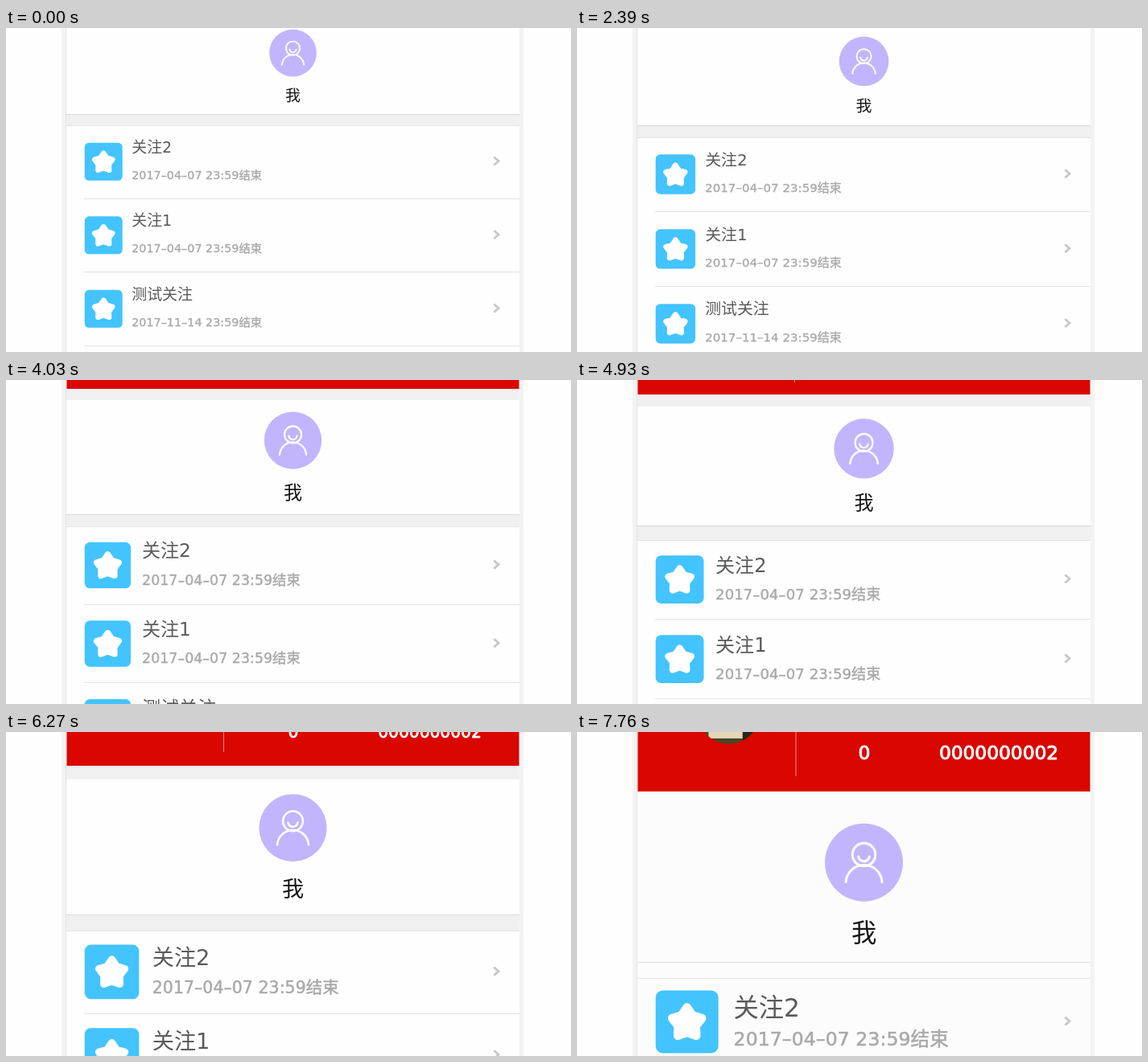
An HTML page with a canvas for the animation above (8 s loop, 702 by 403 pixels).

```html
<!DOCTYPE html>
<html lang="zh">
<head>
<meta charset="utf-8">
<title>列表缩放</title>
<style>
  html, body { margin: 0; width: 100%; height: 100%; overflow: hidden; background: #fefefe; }
  canvas { display: block; }
</style>
</head>
<body>
<canvas id="stage" width="702" height="403"></canvas>
<script>
const ctx = document.getElementById('stage').getContext('2d');
const LOOP = 8000, LEFT = 75, RIGHT = 638, MID = 356.5, INSET = 97;
const FONT = '"DejaVu Sans", "Noto Sans CJK SC", "Noto Sans CJK", sans-serif';

// start time, root size, profile bottom, list top
const STEPS = [
  [0, 9.46, 107, 121], [1350, 8.96, 94, 106], [1940, 9.46, 107, 121],
  [2390, 9.93, 121, 136], [2840, 10.45, 136, 151], [3280, 10.95, 151, 166],
  [3430, 11.52, 167, 182], [4930, 12.01, 181, 199], [5370, 12.51, 197, 215],
  [5820, 13.04, 212, 231], [6270, 13.57, 227, 247], [6570, 14.1, 242, 262],
  [7020, 14.6, 256, 277], [7310, 15.1, 271, 291], [7760, 15.63, 286, 306]
];
const ROWS = [
  ['关注2', '2017–04–07 23:59结束'],
  ['关注1', '2017–04–07 23:59结束'],
  ['测试关注', '2017–11–14 23:59结束'],
  ['test2', '2017–11–14 23:59结束']
];

function box(x, y, w, h, color) {
  ctx.fillStyle = color;
  ctx.fillRect(x, y, w, h);
}

function disc(x, y, r, color) {
  ctx.fillStyle = color;
  ctx.beginPath();
  ctx.arc(x, y, r, 0, 7);
  ctx.fill();
}

// y is the middle of the line, bold the stroke added in em
function text(str, x, y, size, color, { align = 'left', spacing = 0, bold = 0 } = {}) {
  const base = y + size * 0.37;
  ctx.font = `${size}px ${FONT}`;
  ctx.letterSpacing = `${spacing * size}px`;
  ctx.textAlign = align;
  ctx.fillStyle = ctx.strokeStyle = color;
  ctx.fillText(str, x, base);
  if (!bold) return;
  ctx.lineWidth = size * bold;
  ctx.lineJoin = 'round';
  ctx.strokeText(str, x, base);
}

function avatar(x, y, d) {
  disc(x, y, d / 2, '#c3b5fd');
  ctx.strokeStyle = '#fff';
  ctx.lineWidth = d * 0.031;
  ctx.lineCap = 'round';
  const arc = (dy, r, from, to) => {
    ctx.beginPath();
    ctx.arc(x, y + dy * d, r * d, from, to);
    ctx.stroke();
  };
  arc(-0.1, 0.147, 0, 2 * Math.PI);
  arc(-0.087, 0.072, 0.15, Math.PI - 0.15);
  arc(0.265, 0.232, Math.PI * 1.02, Math.PI * 1.98);
}

function starIcon(x, y, w) {
  ctx.fillStyle = '#43c4ff';
  ctx.beginPath();
  ctx.roundRect(x, y, w, w, w * 0.115);
  ctx.fill();
  ctx.beginPath();
  for (let k = 0; k < 10; k++) {
    const r = w * (k % 2 ? 0.15 : 0.25), a = (k / 5 - 0.5) * Math.PI;
    ctx.lineTo(x + w / 2 + r * Math.cos(a), y + w * 0.52 + r * Math.sin(a));
  }
  ctx.closePath();
  ctx.fillStyle = ctx.strokeStyle = '#fff';
  ctx.lineWidth = w * 0.135;
  ctx.lineJoin = 'round';
  ctx.fill();
  ctx.stroke();
}

function chevron(y) {
  ctx.strokeStyle = '#c8c8c8';
  ctx.lineWidth = 2.8;
  ctx.lineCap = 'butt';
  ctx.lineJoin = 'miter';
  ctx.beginPath();
  ctx.moveTo(606.3, y - 5);
  ctx.lineTo(612, y);
  ctx.lineTo(606.3, y + 5);
  ctx.stroke();
}

function photo(x, y, r) {
  ctx.save();
  ctx.beginPath();
  ctx.arc(x, y, r, 0, 7);
  ctx.clip();
  box(x - r, y - r, 2 * r, 2 * r, '#4b4527');
  box(x - r * 0.65, y, r * 1.1, r * 0.82, '#e4d7b4');
  box(x + r * 0.45, y, r * 0.5, r, '#26281c');
  ctx.restore();
}

function header(rem) {
  const bottom = Math.round(15.4 * rem - 166.6);
  if (bottom <= 0) return bottom;
  box(LEFT + 0.5, 0, RIGHT - LEFT - 1, bottom, '#d90700');
  const lineEnd = bottom - Math.round(1.22 * rem);
  if (lineEnd > 0) box(rem > 15 ? 271.5 : 270, 0, 1, lineEnd, '#f08a85');
  photo(188.5, bottom - 6.25 * rem, 2.47 * rem);
  const y = bottom - 3.4 * rem + 4;
  const style = { align: 'center', spacing: -0.004, bold: 0.04 };
  text('0', 357, y, 1.5 * rem, '#fff', style);
  text('0000000002', 543 - 1.215 * rem, y, 1.5 * rem, '#fff', style);
  return bottom;
}

function row([title, date], top, height, rem) {
  const icon = 5.02 * rem - 0.5, mid = top + height / 2 - 0.4;
  const x = INSET + 5.02 * rem + 1.2 * rem + 0.4;
  starIcon(INSET + 0.7, mid - icon / 2, icon);
  text(title, x, top + 1.6 * rem + 11.4, 2 * rem, '#5a5a5a');
  text(date, x, top + 2.33 * rem + 39.3, 1.5 * rem, '#a9a9a9', { spacing: 0.006, bold: 0.025 });
  chevron(mid - 0.8);
}

function draw(now) {
  const t = now % LOOP;
  const [, rem, bottom, top] = STEPS.filter(s => s[0] <= t).pop();
  const flat = rem > 15.5;
  const paper = flat ? '#fcfcfc' : '#fefefe', gap = flat ? paper : '#f0f0f0';
  const width = RIGHT - LEFT;

  box(0, 0, 702, 403, '#fefefe');
  box(69, 0, 574, 403, '#f3f3f3');
  box(74, 0, 1, 403, '#e3e3e3');
  box(LEFT, 0, width, 403, gap);

  const cardTop = Math.max(0, header(rem) + Math.round(1.25 * rem));
  box(LEFT, cardTop, width, bottom - cardTop, paper);
  box(LEFT, bottom, width, 1, '#dadada');
  avatar(MID, bottom - 7.75 * rem - 2.6, 6.2 * rem);
  text('我', MID, bottom - 2.2 * rem - 2.4, 2 * rem, '#151515', { align: 'center' });

  box(LEFT, top, width, 403 - top, paper);
  box(LEFT, top, width, 1, '#e6e6e6');
  const height = 63.6 + 2.95 * rem;
  ROWS.forEach((item, k) => {
    const y = top + k * height;
    if (k) box(INSET, Math.floor(y - 0.3), RIGHT - INSET, 1, '#e4e4e4');
    row(item, y, height, rem);
  });
}

const start = performance.now();
function tick() {
  draw(performance.now() - start);
  requestAnimationFrame(tick);
}
tick();
</script>
</body>
</html>
```
